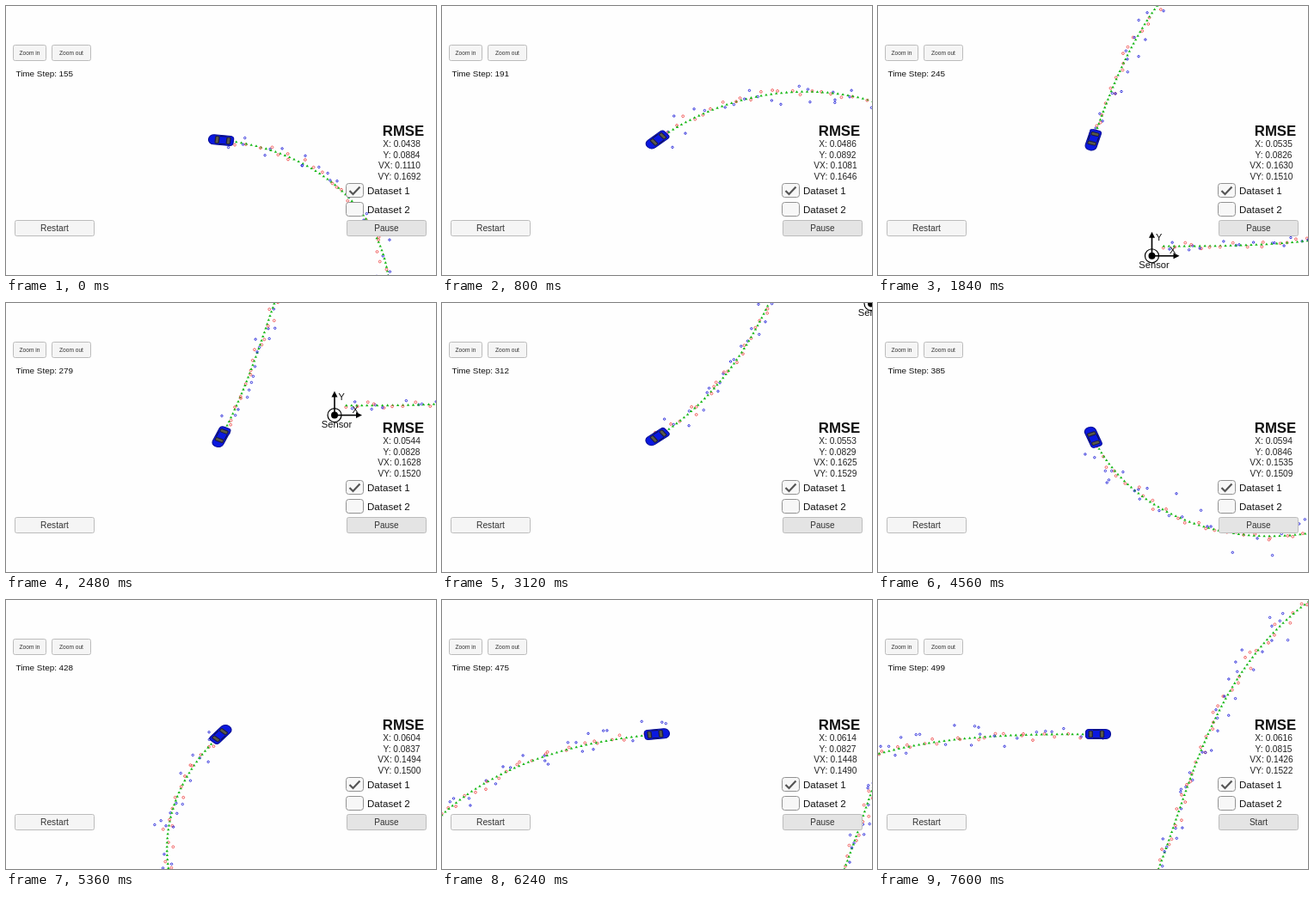
An HTML page with a canvas that plays this animation: 500x313 px, repeating every 7680 ms.

```html
<!DOCTYPE html>
<html lang="en">
<head>
<meta charset="utf-8">
<title>Tracking simulator</title>
<style>
  html, body { margin: 0; width: 100%; height: 100%; overflow: hidden; background: #fefefe; }
  canvas { display: block; }
</style>
</head>
<body>
<canvas id="stage" width="500" height="313"></canvas>
<script>
const ctx = document.getElementById('stage').getContext('2d');
const LOOP = 7680, TICK = 80, STOP = 6800, LAST = 499;
const FONT = '"Liberation Sans", Arial, sans-serif';

// The view is wider than it is high: pixels per metre on each axis
const SCALE = { x: 23, y: 19.1 };
const ASPECT = SCALE.x / SCALE.y;
const CAR = { x: 250, y: 156 };

// Metres per step, half of the largest heading, lidar and radar deviations
const STRIDE = .26, SWING = 2.218;
const LIDAR = .15, RANGE = .3, BEARING = .03;

// Key moments: time, step, errors in X, Y, VX and VY
const KEYS = [
  [0, 155, .0438, .0884, .1110, .1692],
  [800, 191, .0486, .0892, .1081, .1646],
  [1840, 245, .0535, .0826, .1630, .1510],
  [3120, 312, .0553, .0829, .1625, .1529],
  [4560, 385, .0594, .0846, .1535, .1509],
  [6240, 475, .0614, .0827, .1448, .1490],
  [6720, LAST, .0616, .0815, .1426, .1522]
];

function status(time) {
  let i = 0;
  while (i < KEYS.length - 2 && time >= KEYS[i + 1][0]) i++;
  const a = KEYS[i], b = KEYS[i + 1];
  const u = Math.min(1, (time - a[0]) / (b[0] - a[0]));
  const [, step, ...errors] = a.map((v, k) => v + (b[k] - v) * u);
  return { step: Math.round(step), errors };
}

function random(seed) {
  const v = Math.sin(seed * 12.9898) * 43758.5453;
  return v - Math.floor(v);
}

// Roughly normal, unit deviation
function noise(seed) {
  let sum = -2;
  for (let k = 1; k <= 4; k++) sum += random(seed * 4 + k);
  return sum * 1.73;
}

// The car swings left and back again in one slow cosine
const heading = step => SWING * (1 - Math.cos(2 * Math.PI * step / 500));
const toView = (x, y) => ({ x: x * SCALE.x, y: -y * SCALE.y });

function simulate() {
  const track = [];
  let x = .6, y = .6;
  for (let i = 0; i <= LAST; i++) {
    const a = noise(2 * i), b = noise(2 * i + 1), radar = i % 2 === 1;
    const range = Math.hypot(x, y) + RANGE * a;
    const bearing = Math.atan2(y, x) + BEARING * b;
    track.push({
      radar,
      truth: toView(x, y),
      seen: radar
        ? toView(range * Math.cos(bearing), range * Math.sin(bearing))
        : toView(x + LIDAR * a, y + LIDAR * b)
    });
    x += STRIDE * Math.cos(heading(i + .5));
    y += STRIDE * Math.sin(heading(i + .5));
  }
  return track;
}
const track = simulate();

function text(str, x, y, size, { align = 'left', color = '#111', weight = '' } = {}) {
  ctx.font = `${weight} ${size}px ${FONT}`;
  ctx.textAlign = align;
  ctx.fillStyle = color;
  ctx.fillText(str, x, y);
}

function box(x, y, w, h, r, fill, stroke) {
  ctx.beginPath();
  ctx.roundRect(x, y, w, h, r);
  ctx.fillStyle = fill;
  ctx.fill();
  if (!stroke) return;
  ctx.strokeStyle = stroke;
  ctx.lineWidth = 1;
  ctx.stroke();
}

function line(color, width, ...pts) {
  ctx.beginPath();
  pts.forEach(p => ctx.lineTo(...p));
  ctx.strokeStyle = color;
  ctx.lineWidth = width;
  ctx.stroke();
}

function polygon(color, ...pts) {
  ctx.beginPath();
  pts.forEach(p => ctx.lineTo(...p));
  ctx.fillStyle = color;
  ctx.fill();
}

function ring(x, y, r, color, width) {
  ctx.beginPath();
  ctx.arc(x, y, r, 0, 2 * Math.PI);
  ctx.strokeStyle = color;
  ctx.lineWidth = width;
  ctx.stroke();
}

function drawSensor() {
  line('#000', 1.6, [0, 0], [0, -23]);
  line('#000', 1.6, [0, 0], [27, 0]);
  polygon('#000', [0, -28], [-3.5, -21], [3.5, -21]);
  polygon('#000', [32, 0], [25, -3.5], [25, 3.5]);
  ring(0, 0, 8, '#000', 1.2);
  ring(0, 0, 2, '#000', 4);
  text('Y', 4.5, -18, 11);
  text('X', 20.5, -3, 11);
  text('Sensor', 2.5, 14.5, 11.2, { align: 'center' });
}

function drawTrack(step) {
  for (let i = 0; i <= step; i++) {
    const { truth: { x, y }, seen, radar } = track[i];
    ring(seen.x, seen.y, radar ? 1.2 : 1.4, radar ? '#2020d8' : '#f05050', .9);
    polygon('#18b818', [x, y - 1.6], [x - 1.7, y + 1.2], [x + 1.7, y + 1.2]);
  }
}

function drawCar(x, y, angle) {
  ctx.save();
  ctx.translate(x, y);
  ctx.scale(ASPECT, 1);
  ctx.rotate(-angle);
  box(-12, -5.5, 24, 11, [3, 5, 5, 3], '#0a18e0', '#0a1098');
  box(-9, -3.8, 3.5, 7.6, 1, '#5a5a48', '#1c1c40');
  box(2, -4, 3.5, 8, 1, '#5a5a48', '#1c1c40');
  line('#101048', .9, [-5, -4.4], [1.5, -4.4]);
  line('#101048', .9, [-5, 4.4], [1.5, 4.4]);
  ctx.restore();
}

function button(label, x, y, w, size, fill = '#f5f5f5') {
  box(x + .5, y + .5, w - 1, 18, 2, fill, '#bcbcbc');
  text(label, x + w / 2, y + 9.5 + size * .35, size, { align: 'center', color: '#333' });
}

function checkbox(label, y, checked) {
  box(395.5, y + .5, 20, 16, 3, '#f7f7f7', '#929292');
  if (checked) line('#555', 2.2, [399.5, y + 9], [403.5, y + 13], [411.5, y + 4.5]);
  text(label, 420, y + 12.5, 11.6);
}

function drawPanel(step, errors, done) {
  button('Zoom in', 8, 45, 39, 6.6);
  button('Zoom out', 53, 45, 46, 6.6);
  text('Time Step: ' + step, 11.5, 81.5, 9.9);
  button('Restart', 10, 249, 93, 10.2);
  button(done ? 'Start' : 'Pause', 396, 249, 93, 10, '#e4e4e4');
  text('RMSE', 462, 151, 16.8, { align: 'center', weight: 'bold' });
  ['X', 'Y', 'VX', 'VY'].forEach((name, i) => {
    const label = `${name}: ${errors[i].toFixed(4)}`;
    text(label, i < 2 ? 460 : 457.5, 164 + 12.6 * i, 10.2, { align: 'center', color: '#222' });
  });
  checkbox('Dataset 1', 206, true);
  checkbox('Dataset 2', 228, false);
}

function draw(now) {
  const time = Math.floor((now % LOOP) / TICK) * TICK;
  const { step, errors } = status(time);
  const done = time >= STOP;
  const at = track[step].truth;

  ctx.fillStyle = '#fefefe';
  ctx.fillRect(0, 0, 500, 313);
  ctx.save();
  ctx.translate(CAR.x - at.x, CAR.y - at.y);
  drawSensor();
  drawTrack(step);
  ctx.restore();
  // The car rolls on for one stride when it stops
  drawCar(CAR.x + (done ? STRIDE * SCALE.x : 0), CAR.y, heading(step));
  drawPanel(step, errors, done);
}

const start = performance.now();
function loop() {
  draw(performance.now() - start);
  requestAnimationFrame(loop);
}
loop();
</script>
</body>
</html>
```
